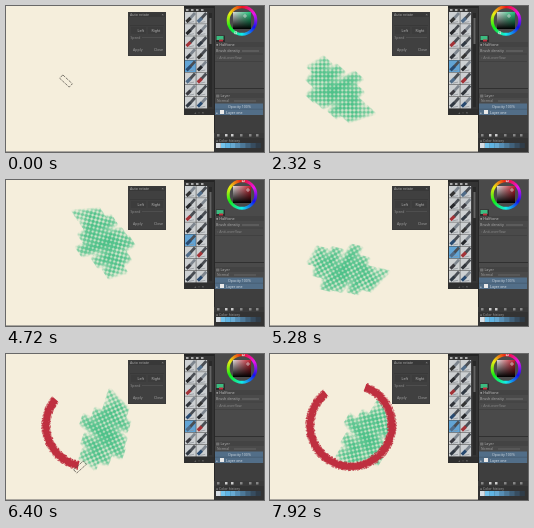
Write an HTML page with a canvas that moves like this. It is 258x146 px and loops after 8000 ms.

```html
<!DOCTYPE html>
<html>
<head>
<meta charset="utf-8">
<style>
html, body { margin: 0; width: 100%; height: 100%; overflow: hidden; background: #f5eedc; }
canvas { display: block; }
</style>
</head>
<body>
<canvas id="stage" width="258" height="146"></canvas>
<script>
const LOOP = 8000, RAD = Math.PI / 180;
const PIVOT = { x: 81, y: 71.5 };
const SPIN_AT = 3930, SPIN_RATE = 0.245;       // degrees per ms
const RED_AT = 5920, RED_SWEEP = 302, RED_RADIUS = 41;
const PAINT_AT = 240, PAINT_END = 1950;
const PICK_AT = 3000, BRUSH_AT = 5200;
const CHISEL = 43;                             // tilt of the brush while scribbling
const SCRIBBLE = [[42, 64], [57, 55], [41, 77], [70, 63], [41, 92], [88, 70],
  [50, 98], [89, 83], [63, 108], [90, 95], [76, 112], [100, 104]];

const stage = document.getElementById('stage');
const ctx = stage.getContext('2d');

function makeCanvas(w, h) {
  const c = document.createElement('canvas');
  c.width = w;
  c.height = h;
  return c;
}

function randomFrom(seed) {
  return () => {
    seed = (seed * 1664525 + 1013904223) >>> 0;
    return seed / 4294967296;
  };
}

function rect(g, x, y, w, h, fill) {
  g.fillStyle = fill;
  g.fillRect(x, y, w, h);
}

function label(g, text, x, y, fill = '#a4a4a4', size = 4) {
  g.fillStyle = fill;
  g.font = size + 'px "Noto Sans", sans-serif';
  g.fillText(text, x, y);
}

function line(g, x1, y1, x2, y2, color, width = 1) {
  g.strokeStyle = color;
  g.lineWidth = width;
  g.beginPath();
  g.moveTo(x1, y1);
  g.lineTo(x2, y2);
  g.stroke();
}

const clamp = v => Math.max(0, Math.min(1, v));
const ease = v => { v = clamp(v); return v * v * (3 - 2 * v); };
const mix = (a, b, k) => a + (b - a) * k;
const spinAt = t => Math.max(0, t - SPIN_AT) * SPIN_RATE;

// Green halftone scribble

const BOX = { x: 26, y: 42, w: 92, h: 86, scale: 2 };
const mask = makeCanvas(BOX.w * BOX.scale, BOX.h * BOX.scale);
const maskCtx = mask.getContext('2d', { willReadFrequently: true });
const green = makeCanvas(mask.width, mask.height);
const greenCtx = green.getContext('2d');
let greenDone = -1;

const lengths = SCRIBBLE.slice(1).map((p, i) =>
  Math.hypot(p[0] - SCRIBBLE[i][0], p[1] - SCRIBBLE[i][1]));
const total = lengths.reduce((a, b) => a + b, 0);

function scribblePoints(part) {
  let left = part * total;
  const points = [SCRIBBLE[0]];
  for (let i = 0; i < lengths.length && left > 0; i++) {
    const k = Math.min(1, left / lengths[i]), a = SCRIBBLE[i], b = SCRIBBLE[i + 1];
    points.push([mix(a[0], b[0], k), mix(a[1], b[1], k)]);
    left -= lengths[i];
  }
  return points;
}

// The chisel tip leaves a bundle of parallel strokes
function renderMask(part) {
  const s = BOX.scale, points = scribblePoints(part);
  maskCtx.setTransform(1, 0, 0, 1, 0, 0);
  maskCtx.clearRect(0, 0, mask.width, mask.height);
  maskCtx.setTransform(s, 0, 0, s, -BOX.x * s, -BOX.y * s);
  maskCtx.lineCap = maskCtx.lineJoin = 'round';
  maskCtx.strokeStyle = 'rgba(0,0,0,.34)';
  maskCtx.lineWidth = 4.5;
  for (let d = -5; d <= 5; d++) {
    const dx = d * Math.cos(CHISEL * RAD), dy = d * Math.sin(CHISEL * RAD);
    maskCtx.beginPath();
    points.forEach(p => maskCtx.lineTo(p[0] + dx, p[1] + dy));
    maskCtx.stroke();
  }
}

function renderGreen(part) {
  if (part === greenDone) return;
  greenDone = part;
  renderMask(part);
  const { width: w, height: h } = mask, s = BOX.scale;
  const src = maskCtx.getImageData(0, 0, w, h).data;
  const out = greenCtx.createImageData(w, h);
  const k = 2 * Math.PI / 4;
  for (let i = 0; i < w * h; i++) {
    const m = src[i * 4 + 3] / 255;
    if (!m) continue;
    const x = (i % w) / s + BOX.x, y = Math.floor(i / w) / s + BOX.y;
    const dots = (Math.cos(x * k) + Math.cos(y * k)) / 2;
    const core = 1 - Math.hypot(x - 68, y - 82) / 40;
    const cloud = 0.18 * Math.sin(x * 0.21 + y * 0.13) * Math.sin(y * 0.19 - x * 0.08);
    const ink = clamp(0.5 + 0.45 * core + cloud - dots * 0.8);
    out.data.set([55, 187, 126, 255 * m * m * (0.2 + 0.72 * ink)], i * 4);
  }
  greenCtx.putImageData(out, 0, 0);
}

// Red ring, laid down under a resting brush

const specks = [];
const rnd = randomFrom(17);
for (let i = 0; i < 1200; i++) {
  const side = rnd() < 0.5 ? -1 : 1;
  specks.push({
    angle: rnd() * RED_SWEEP,
    radius: RED_RADIUS + side * (2.9 + rnd() * 1.5),
    size: 0.3 + rnd() * 0.4,
    pale: rnd() < 0.15
  });
}

function drawRing(sweep) {
  ctx.save();
  ctx.translate(PIVOT.x, PIVOT.y);
  ctx.rotate((102 - spinAt(RED_AT)) * RAD);
  ctx.strokeStyle = '#bf2f3f';
  ctx.lineWidth = 6.8;
  ctx.beginPath();
  ctx.arc(0, 0, RED_RADIUS, -sweep * RAD, 0);
  ctx.stroke();
  for (const p of specks) {
    if (p.angle > sweep) continue;
    ctx.fillStyle = p.pale ? 'rgba(235,190,180,.6)' : 'rgba(191,47,63,.75)';
    const a = -p.angle * RAD;
    ctx.beginPath();
    ctx.arc(Math.cos(a) * p.radius, Math.sin(a) * p.radius, p.size, 0, 7);
    ctx.fill();
  }
  ctx.restore();
}

function drawArt(t) {
  const part = clamp((t - PAINT_AT) / (PAINT_END - PAINT_AT));
  ctx.save();
  ctx.translate(PIVOT.x, PIVOT.y);
  ctx.rotate(spinAt(t) * RAD);
  ctx.translate(-PIVOT.x, -PIVOT.y);
  if (part > 0) {
    renderGreen(part);
    ctx.drawImage(green, BOX.x, BOX.y, BOX.w, BOX.h);
  }
  const sweep = Math.min(RED_SWEEP, (t - RED_AT) * SPIN_RATE);
  if (sweep > 0) drawRing(sweep);
  ctx.restore();
}

// Brush outline

function brushOutline(x, y, angle) {
  ctx.save();
  ctx.translate(x, y);
  ctx.rotate(angle * RAD);
  ctx.strokeStyle = '#55504a';
  ctx.lineWidth = 0.7;
  ctx.setLineDash([3, 1]);
  ctx.strokeRect(-6.5, -2.3, 13, 4.6);
  ctx.restore();
}

function drawBrush(t) {
  if (t < PAINT_AT) {
    const k = ease((t - 90) / 140);
    brushOutline(mix(60, 42, k), mix(75, 64, k), CHISEL);
  } else if (t < PAINT_END) {
    const p = scribblePoints((t - PAINT_AT) / (PAINT_END - PAINT_AT)).pop();
    brushOutline(p[0], p[1], CHISEL);
  } else if (t < 2240) {
    const k = ease((t - PAINT_END) / 290);
    brushOutline(mix(100, 200, k), mix(104, 60, k), CHISEL);
  } else if (t > 5350 && t < 7280) {
    const k = ease((t - 5350) / 350);
    brushOutline(mix(150, 74, k), mix(70, 113, k), -42);
  }
}

// Interface panels

function drawDialog(g, pressed) {
  rect(g, 122, 6, 38, 44, '#3a3a3a');
  rect(g, 123, 7, 36, 42, '#404040');
  rect(g, 123, 7, 36, 4, '#383838');
  label(g, 'Auto rotate', 124, 10.2, '#a8a8a8', 3.6);
  label(g, '×', 155.5, 10.4, '#a0a0a0');
  line(g, 124, 19.5, 158, 19.5, '#353535', 0.6);
  rect(g, 125, 21, 15, 7, pressed ? '#555' : '#3c3c3c');
  rect(g, 142, 21, 15, 7, '#3c3c3c');
  label(g, 'Left', 131.5, 26, pressed ? '#eee' : '#b4b4b4', 3.6);
  label(g, 'Right', 145.5, 26, '#b4b4b4', 3.6);
  label(g, 'Speed', 124.5, 33, '#8c8c8c', 3.4);
  line(g, 136, 31.5, 157, 31.5, '#555', 0.7);
  label(g, 'Apply', 127, 45, '#a0a0a0', 3.6);
  label(g, 'Close', 148, 45, '#a0a0a0', 3.6);
}

const TIPS = ['#333', '#303842', '#3a3a40', '#4f6b88', '#284a70', '#30343a', '#a33237', '#25272b'];

function drawBrushes(g, selected) {
  rect(g, 178, 0, 30, 109, '#343434');
  rect(g, 178, 0, 30, 2, '#252525');
  for (let i = 0; i < 4; i++) rect(g, 180 + i * 5, 3, 2.5, 2, '#aaa');
  for (let i = 0; i < 16; i++) {
    const row = i >> 1, x = 179 + (i % 2) * 11.3, y = 6 + row * 12.1;
    const on = i % 2 === 0 && row === selected;
    rect(g, x, y, 10.8, 11.7, on ? '#62a4d5' : '#cdd0d2');
    const tip = TIPS[(i * 3 + row) % 8];
    line(g, x + 10, y + 1, x + 5, y + 6.5, i % 3 ? '#4a4e54' : '#7d858e', 2.8);
    line(g, x + 5.5, y + 6, x + 1.5, y + 10, tip, 3.2);
    line(g, x + 4, y + 10.6, x + 9, y + 9.6, '#8b9096', 0.7);
  }
  rect(g, 203, 7, 3, 94, '#292929');
  rect(g, 203.5, 12, 2, 26, '#646464');
  rect(g, 178, 103, 30, 6, '#2f2f2f');
  label(g, '+  ▫  ×', 188, 107.5, '#959595', 4);
}

function drawWheel(g, red) {
  const hue = red ? 355 : 153, cx = 236, cy = 14.5, r = 13.8;
  const ring = g.createConicGradient(-Math.PI / 2, cx, cy);
  for (let i = 0; i <= 12; i++) ring.addColorStop(i / 12, `hsl(${360 - i * 30},85%,50%)`);
  g.strokeStyle = ring;
  g.lineWidth = 3;
  g.beginPath();
  g.arc(cx, cy, r, 0, 7);
  g.stroke();
  const shade = g.createLinearGradient(227, 0, 245, 0);
  shade.addColorStop(0, '#eee');
  shade.addColorStop(1, `hsl(${hue},75%,48%)`);
  rect(g, 227, 6, 18, 17, shade);
  const dark = g.createLinearGradient(0, 6, 0, 23);
  dark.addColorStop(0, 'rgba(0,0,0,.08)');
  dark.addColorStop(1, '#000');
  rect(g, 227, 6, 18, 17, dark);
  const a = (-hue - 90) * RAD;
  g.strokeStyle = '#ddd';
  g.lineWidth = 0.7;
  g.strokeRect(cx - 1 + Math.cos(a) * r, cy - 1 + Math.sin(a) * r, 2, 2);
  g.beginPath();
  g.arc(red ? 242 : 239, 10, 1.2, 0, 7);
  g.stroke();
  rect(g, 210, 29.5, 9, 6.5, '#2b2b2b');
  rect(g, 210.5, 30, 7, 4, '#3cbb80');
  rect(g, 213, 33.5, 4, 2, '#bf2f3f');
}

function drawSide(g, red) {
  rect(g, 208, 0, 50, 146, '#4a4a4a');
  rect(g, 208, 0, 1, 146, '#282828');
  drawWheel(g, red);
  rect(g, 209, 36, 49, 5, '#434343');
  label(g, '● Halftone', 210, 40, '#bbb', 3.8);
  label(g, 'Brush density', 210, 46, '#aaa', 3.7);
  line(g, 236, 45, 253, 45, '#777', 0.8);
  label(g, '▫ Anti-overflow', 211, 53, '#888', 3.6);
  line(g, 209, 48, 257, 48, '#3c3c3c', 0.6);
  line(g, 209, 55.5, 257, 55.5, '#3c3c3c', 0.6);
  rect(g, 209, 82, 49, 1, '#303030');
  rect(g, 209, 87, 49, 5, '#434343');
  label(g, '▤ Layer', 210, 91, '#aaa', 3.7);
  label(g, 'Normal', 211, 96, '#999', 3.4);
  line(g, 228, 95, 250, 95, '#777', 0.6);
  rect(g, 209, 97.5, 48, 11.5, '#526e88');
  line(g, 209, 103.2, 257, 103.2, '#405468', 0.6);
  label(g, 'Opacity 100%', 222, 102, '#c4ced7', 3.6);
  rect(g, 214, 104, 4, 4, '#e9e9e9');
  label(g, '●', 210, 107.5, '#ddd', 3);
  label(g, 'Layer one', 220, 107.5, '#d3dce4', 3.6);
  rect(g, 209, 109, 49, 18, '#3e3e3e');
  rect(g, 208, 127, 50, 5, '#3a3a3a');
  [211, 219, 225, 234, 243, 250].forEach((x, i) =>
    rect(g, x, 128, 2.5, 2.5, i === 1 || i === 2 ? '#ccc' : '#858585'));
  rect(g, 208, 132, 50, 14, '#333');
  label(g, '● Color history', 210, 135.5, '#999', 3.5);
  const blues = ['#d8dfe5', '#74c4ed', '#5fb3e2', '#67a9d2', '#568eb5', '#4c7898', '#40617b', '#374d60', '#303d49'];
  blues.forEach((c, i) => rect(g, 210 + i * 5, 137, 4.8, 5, c));
}

function makeInterface(pressed, selected, red) {
  const c = makeCanvas(258, 146), g = c.getContext('2d');
  rect(g, 0, 145, 208, 1, '#aaa69e');
  drawSide(g, red);
  drawBrushes(g, selected);
  drawDialog(g, pressed);
  return c;
}

const panels = {};
function interfaceAt(t) {
  const pressed = t >= 3800 && t < 4080;
  const selected = t < BRUSH_AT ? 4 : 5;
  const red = t >= PICK_AT;
  const key = [pressed, selected, red].join();
  return panels[key] || (panels[key] = makeInterface(pressed, selected, red));
}

function draw(t) {
  rect(ctx, 0, 0, 258, 146, '#f5eedc');
  drawArt(t);
  drawBrush(t);
  ctx.drawImage(interfaceAt(t), 0, 0);
}

const start = performance.now();
function tick() {
  draw((performance.now() - start) % LOOP);
  requestAnimationFrame(tick);
}
tick();
</script>
</body>
</html>
```
